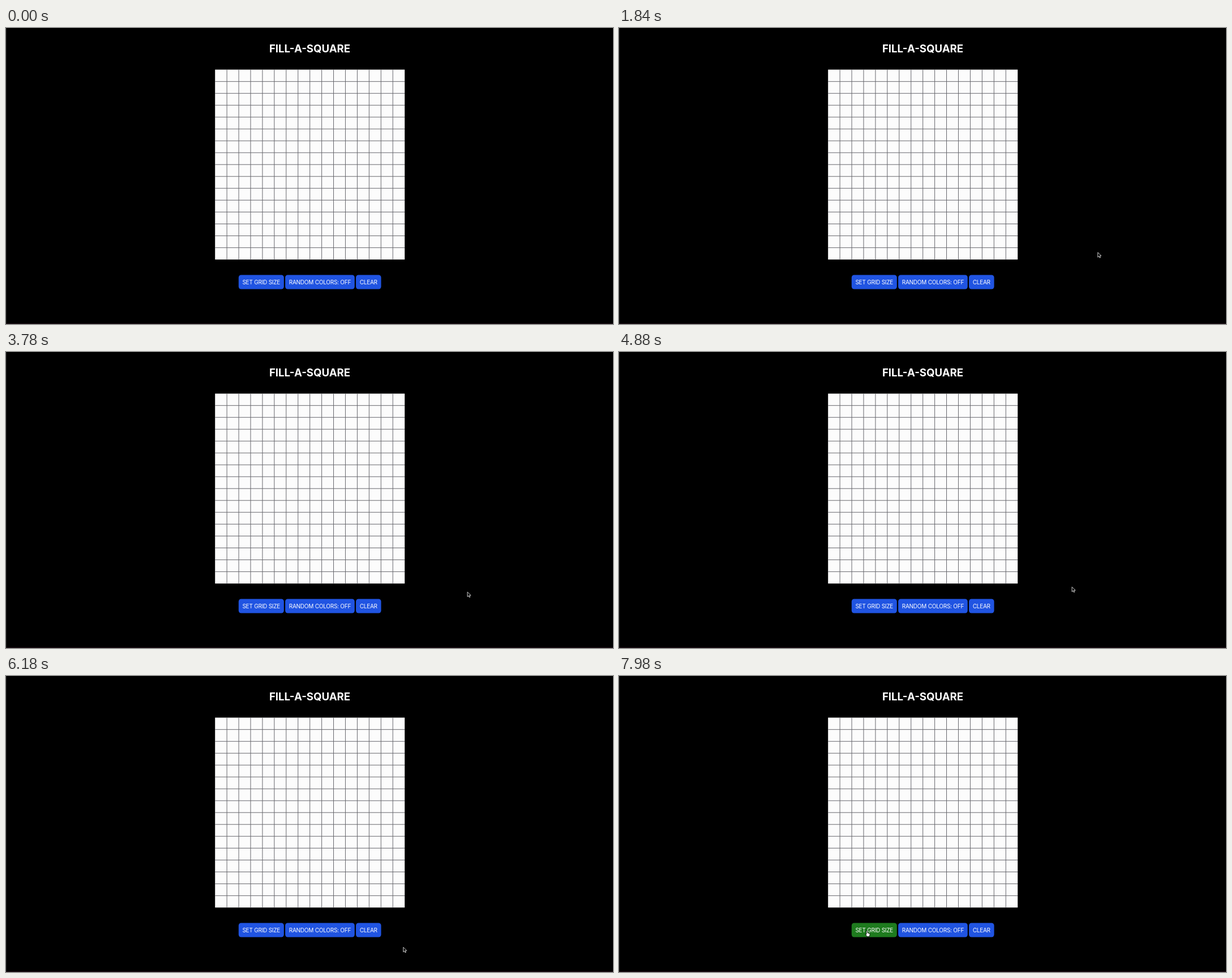
An HTML page that plays this animation: 1072x522 px, repeating every 8000 ms.

```html
<!DOCTYPE html>
<html lang="en">
<head>
<meta charset="utf-8">
<title>Sketch pad</title>
<style>
  html, body { margin: 0; width: 100%; height: 100%; overflow: hidden; background: #000; }
  svg { display: block; width: 1072px; height: 522px; }
  text { font-family: Inter, "Liberation Sans", sans-serif; fill: #fff; text-anchor: middle; }
  .title { font-size: 18.6px; font-weight: 700; }
  .button text { font-size: 10px; letter-spacing: -.23px; }
  .button rect { fill: #2054e2; }
  .button.hover rect { fill: #1e7b1e; }
  #arrow, #hand { stroke-width: .8; stroke-linejoin: round; }
</style>
</head>
<body>
<svg viewBox="0 0 1072 522">
  <rect width="1" height="522" fill="#1c1c1c"/>
  <rect y="521" width="1072" height="1" fill="#24131c"/>
  <text class="title" x="536.5" y="42.5">FILL-A-SQUARE</text>
  <g id="board"></g>
  <g id="buttons"></g>
  <path id="arrow" d="M0 .3V8.7L2 6.9 3.3 9.8 4.7 9.2 3.4 6.3H6Z" fill="#000" stroke="#fff"/>
  <path id="hand" d="M-1 1A1 1 0 0 1 1 1V4L5 5V7.5L4 10.5H0L-3 6-1 6.5Z" fill="#fff" stroke="#000"/>
</svg>
<script>
const LOOP = 8000, ENTER = 830, BUTTON_BOTTOM = 460.5;
const $ = id => document.getElementById(id);

function drawBoard(x, y, size, cells) {
  let lines = "";
  for (let i = 1; i < cells; i++) {
    const d = i * size / cells;
    lines += `M${x + d} ${y}v${size}M${x} ${y + d}h${size}`;
  }
  $("board").innerHTML =
    `<rect x="${x}" y="${y}" width="${size}" height="${size}" fill="#fcfcfc"/>
     <path d="${lines}" stroke="#66666c"/>`;
}

function drawButtons(x, gap, widths) {
  for (const [label, w] of Object.entries(widths)) {
    $("buttons").innerHTML +=
      `<g class="button"><rect x="${x}" y="435.5" width="${w}" height="25" rx="4.5"/>
       <text x="${x + w / 2}" y="451.8">${label}</text></g>`;
    x += w + gap;
  }
}

drawBoard(369.2, 73.4, 334.9, 16);
drawButtons(410.8, 2.3, { "SET GRID SIZE": 80, "RANDOM COLORS: OFF": 122.6, "CLEAR": 44.5 });
const sizeButton = $("buttons").firstElementChild;

// Key points of the pointer's way: time, x, y
const path = [
  [ENTER, 1070, 350], [1140, 1043, 376], [1560, 879, 381], [2360, 816, 424],
  [3500, 816, 424], [4880, 800, 414], [5900, 779, 446], [6180, 702, 478],
  [6740, 480, 478], [7120, 443, 469], [7560, 438, 449], [LOOP, 438, 449]
];

function slope(i, axis) {
  const rate = k => path[k] && path[k + 1]
    ? (path[k + 1][axis] - path[k][axis]) / (path[k + 1][0] - path[k][0]) : 0;
  const before = rate(i - 1), after = rate(i);
  return before * after > 0 ? 2 * before * after / (before + after) : 0;
}

// Monotone cubic between key points
function position(t, axis) {
  const i = path.findLastIndex(p => p[0] <= t);
  const a = path[i], b = path[i + 1], span = b[0] - a[0];
  const u = (t - a[0]) / span, v = 1 - u;
  return v * v * (1 + 2 * u) * a[axis] + u * u * (1 + 2 * v) * b[axis]
       + span * u * v * (v * slope(i, axis) - u * slope(i + 1, axis));
}

function draw(t) {
  const visible = t >= ENTER;
  const x = visible ? position(t, 1) : 0, y = visible ? position(t, 2) : 0;
  const hover = x > 411 && x < 491 && y < BUTTON_BOTTOM && y > 435;
  for (const id of ["arrow", "hand"]) {
    $(id).setAttribute("transform", `translate(${x} ${y})`);
    $(id).style.visibility = visible && hover === (id === "hand") ? "visible" : "hidden";
  }
  sizeButton.classList.toggle("hover", hover);
}

const start = performance.now();
function tick() {
  draw((performance.now() - start) % LOOP);
  requestAnimationFrame(tick);
}
tick();
</script>
</body>
</html>
```
